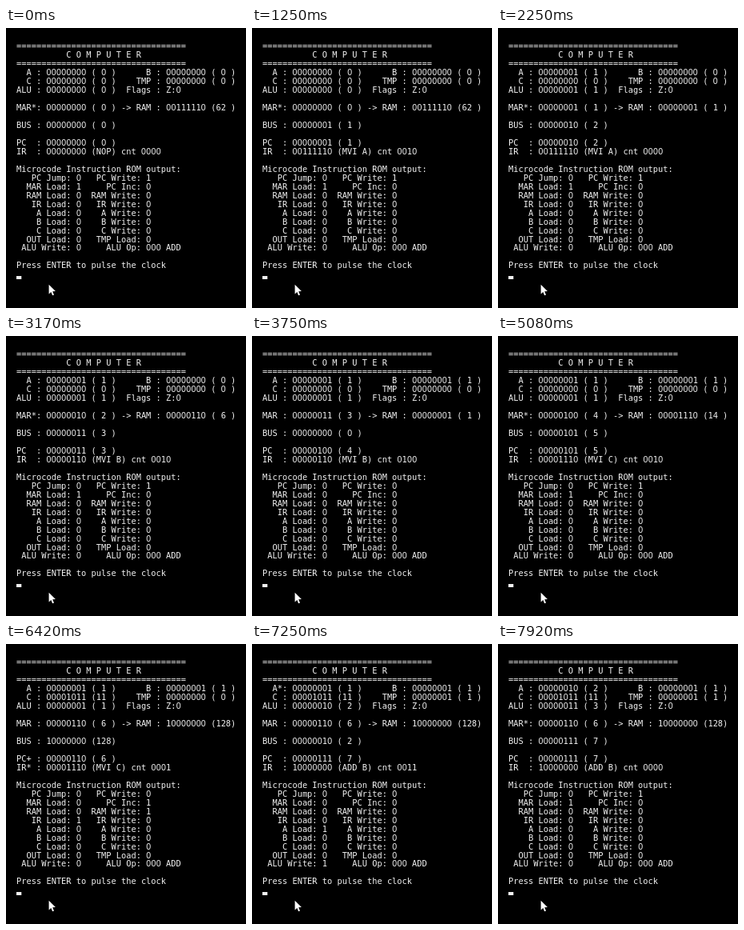
Recreate the animation shown at these times as an HTML page with a canvas. Size 300 px wide and 350 px high, loop 8 s.

```html
<!DOCTYPE html>
<html lang="en">
<head>
<meta charset="utf-8">
<title>Computer</title>
<style>
  html, body { margin: 0; width: 100%; height: 100%; overflow: hidden; background: #000; }
  canvas { display: block; }
</style>
</head>
<body>
<canvas id="stage" width="300" height="350"></canvas>
<script>
const ctx = document.getElementById('stage').getContext('2d');
const LOOP = 8000, TICK = 1000 / 12;
const CELL = 6.235, LINE = 10.96, LEFT = 13, BASE = 26.4;
const MONO = '10.35px "DejaVu Sans Mono", monospace';
const PLAIN = '10.6px "Liberation Sans", sans-serif'; // zero without a dot

// clock pulses, in ticks of 1/12 s
const PULSES = [6, 11, 16, 21, 27, 33, 37, 41, 45, 50, 54, 59, 63, 68, 72, 77, 81, 86, 90, 95];

const RAM = [0x3e, 1, 0x06, 1, 0x0e, 11, 0x80, 0];
const OPS = { 0: 'NOP', 0x3e: 'MVI A', 0x06: 'MVI B', 0x0e: 'MVI C', 0x80: 'ADD B' };
const SIGNALS = [
  ['PC Jump', 'PC Write'], ['MAR Load', 'PC Inc'], ['RAM Load', 'RAM Write'],
  ['IR Load', 'IR Write'], ['A Load', 'A Write'], ['B Load', 'B Write'],
  ['C Load', 'C Write'], ['OUT Load', 'TMP Load'], ['ALU Write', 'ALU Op']
];

function microcode(op, cnt) {
  if (cnt === 0) return ['PC Write', 'MAR Load'];
  if (cnt === 1) return ['RAM Write', 'IR Load', 'PC Inc'];
  const [name, reg] = op.split(' ');
  if (name === 'MVI' && cnt === 2) return ['PC Write', 'MAR Load'];
  if (name === 'MVI' && cnt === 3) return ['RAM Write', reg + ' Load', 'PC Inc'];
  if (name === 'ADD' && cnt === 2) return [reg + ' Write', 'TMP Load'];
  if (name === 'ADD' && cnt === 3) return ['ALU Write', 'A Load'];
  return [];
}

// Fill in everything that follows from the registers
function settle(cpu) {
  cpu.on = microcode(OPS[cpu.IR], cpu.cnt);
  cpu.ALU = cpu.A + cpu.TMP;
  cpu.RAM = RAM[cpu.MAR];
  const writer = cpu.on.find(s => s.endsWith('Write'));
  cpu.BUS = writer ? cpu[writer.split(' ')[0]] : 0;
  return cpu;
}

function pulse(cpu) {
  const next = { ...cpu, cnt: (cpu.cnt + 1) % 5 };
  for (const s of cpu.on) {
    const [reg, action] = s.split(' ');
    if (action === 'Load') next[reg] = cpu.BUS;
    if (action === 'Inc') next[reg]++;
  }
  return settle(next);
}

const states = [settle({ A: 0, B: 0, C: 0, TMP: 0, MAR: 0, PC: 0, IR: 0, cnt: 0 })];
PULSES.forEach(() => states.push(pulse(states[states.length - 1])));

const bin = (n, width) => n.toString(2).padStart(width, '0');
const dec = n => '(' + String(n).padStart(2).padEnd(3) + ')';

function screen(cpu) {
  const has = s => cpu.on.includes(s);
  const star = reg => has(reg + ' Load') ? '*' : ' ';
  const row = reg => reg.padStart(3) + star(reg) + ': ' + bin(cpu[reg], 8) + ' ' + dec(cpu[reg]);
  const bit = s => s.padStart(10) + ': ' + (s === 'ALU Op' ? '000 ADD' : +has(s));
  const rule = '='.repeat(34);
  return [
    rule,
    ' '.repeat(10) + 'C O M P U T E R',
    rule,
    row('A') + '    ' + row('B'),
    row('C') + '    ' + row('TMP'),
    row('ALU') + '  Flags : Z:0',
    '',
    row('MAR') + ' -> ' + row('RAM'),
    '',
    row('BUS'),
    '',
    'PC' + (has('PC Inc') ? '+' : ' ') + ' : ' + bin(cpu.PC, 8) + ' ' + dec(cpu.PC),
    'IR' + star('IR') + ' : ' + bin(cpu.IR, 8) + ' (' + OPS[cpu.IR] + ') cnt ' + bin(cpu.cnt, 4),
    '',
    'Microcode Instruction ROM output:',
    ...SIGNALS.map(([a, b]) => bit(a) + ' ' + bit(b)),
    '',
    'Press ENTER to pulse the clock'
  ];
}

function drawText(lines) {
  ctx.fillStyle = '#f2f2f2';
  ctx.textAlign = 'center';
  ctx.textBaseline = 'alphabetic';
  lines.forEach((line, r) => {
    [...line].forEach((ch, c) => {
      if (ch === ' ') return;
      ctx.font = ch === '0' ? PLAIN : MONO;
      ctx.fillText(ch, LEFT + (c + 0.5) * CELL, BASE + r * LINE);
    });
  });
}

function drawPointer(x, y) {
  const tip = [[0, 0], [0, 11.6], [2.7, 9.1], [4.5, 13.4], [6.4, 12.6], [4.6, 8.4], [8.3, 8.2]];
  ctx.beginPath();
  tip.forEach(([dx, dy]) => ctx.lineTo(x + dx, y + dy));
  ctx.closePath();
  ctx.fillStyle = '#fff';
  ctx.fill();
}

let shown = -1;
function frame(now) {
  const t = now % LOOP;
  const step = PULSES.filter(p => p * TICK <= t).length;
  if (step !== shown) {
    shown = step;
    ctx.fillStyle = '#000';
    ctx.fillRect(0, 0, 300, 350);
    drawText(screen(states[step]));
    ctx.fillStyle = '#f2f2f2';
    ctx.fillRect(LEFT, 310, 6.3, 4);
    drawPointer(53.6, 320.8);
  }
  requestAnimationFrame(frame);
}
frame(performance.now());
</script>
</body>
</html>
```
